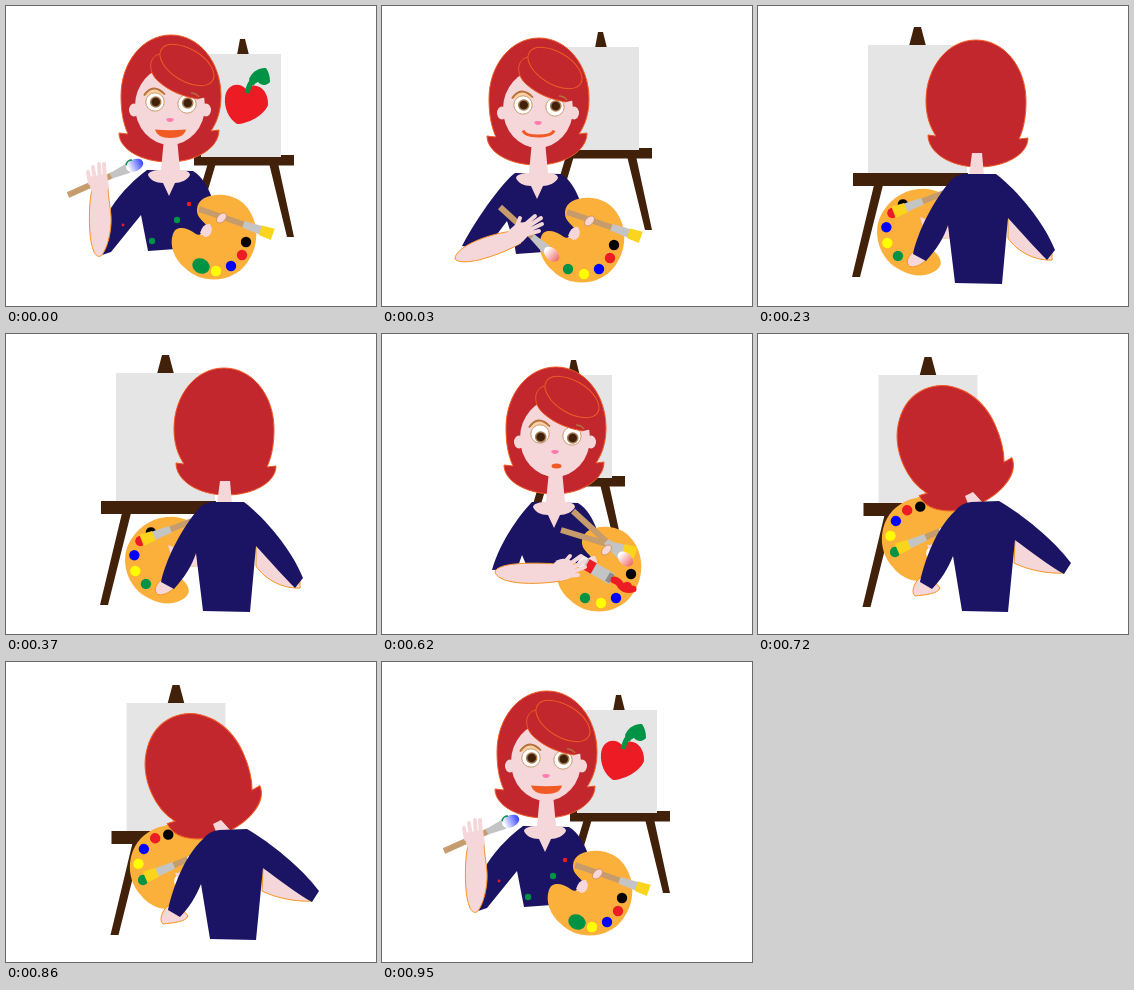
These frames come from a looping animation (370x300 px, 980 ms). An HTML page:

```html
<!DOCTYPE html>
<html lang="en">
<head>
<meta charset="utf-8">
<title>Painter</title>
<style>
  html, body { margin: 0; width: 100%; height: 100%; overflow: hidden; background: #fff; }
  svg { display: block; width: 370px; height: 300px; }
</style>
</head>
<body>
<svg id="stage" viewBox="0 0 370 300"></svg>
<script>
const SKIN = '#f5d7da', NAVY = '#1b1464', WOOD = '#42210b', HAIR = '#c1272d',
  ORANGE = '#f15a24', EDGE = '#f7931e', TAN = '#c69c6d', GREY = '#c4c4c4', BROW = '#b5703c',
  RED = '#ed1c24', GREEN = '#009245', BLUE = '#0000ff', YELLOW = '#ffff00', GOLD = '#fbd51d';

const path = (d, fill, extra = '') => `<path d="${d}" fill="${fill}" ${extra}/>`;
const rim = (color, width = 1) => `stroke="${color}" stroke-width="${width}"`;
const line = (d, color, width, extra = '') => path(d, 'none', `${rim(color, width)} ${extra}`);
const oval = (x, y, rx, ry, fill, turn = 0, extra = '') =>
  `<ellipse cx="${x}" cy="${y}" rx="${rx}" ry="${ry}" fill="${fill}" transform="rotate(${turn} ${x} ${y})" ${extra}/>`;
const dot = (x, y, r, fill, extra = '') => oval(x, y, r, r, fill, 0, extra);
const rect = (x, y, w, h, fill) => `<rect x="${x}" y="${y}" width="${w}" height="${h}" fill="${fill}"/>`;
const group = (transform, ...parts) => `<g transform="${transform}">${parts.join('')}</g>`;
const move = (x, y, ...parts) => group(`translate(${x} ${y})`, ...parts);
const skin = d => path(d, SKIN, rim(EDGE));
const fingers = (d, width = 4) => line(d, SKIN, width, 'stroke-linecap="round"');

// Brushes lie along +x from the handle end.
const brush = (x, y, turn, length) => group(
  `translate(${x} ${y}) rotate(${turn})`,
  path(`M0-3H${length - 28}V3H0Z`, TAN),
  path(`M${length - 31}-3.5L${length - 12}-4.5V4.5L${length - 31} 3.5Z`, GREY),
  path(`M${length - 13}-5L${length}-6V6L${length - 13} 5Z`, GOLD));
const softBrush = (x, y, turn, length, tip) => group(
  `translate(${x} ${y}) rotate(${turn})`,
  path(`M0-3H${length - 32}V3H0Z`, TAN),
  path(`M${length - 34}-3L${length - 15}-5V5L${length - 34} 3Z`, GREY),
  oval(length - 8, 0, 9, 6, tip));

// Front view pieces
const easel = (x, y, art = '') => move(x, y,
  path('M234 33H239L243 49H231Z', WOOD),
  path('M202 157H210L196 204H188Z M263 157H272L288 231H281Z', WOOD),
  rect(188, 149, 100, 10.5, WOOD), rect(195, 48, 80, 103, '#e5e5e5'), art);

const apple = path('M240 83C233 75 220 78 219 92C218 102 223 113 231 118C241 118 258 110 262 99C263 84 250 74 240 83Z', RED)
  + line('M241 87Q243 78 248 72', GREEN, 5)
  + path('M243 73C247 64 254 62 260 62C263 66 264 71 264 76C259 81 255 79 252 76Q249 77 247 80Z', GREEN);

const hair = path('M165 29C193 29 215 56 215 90C215 105 211 116 205 125L213 124C213 142 190 156 163 156C135 156 113 143 113 127L122 128C117 117 115 105 115 90C115 56 137 29 165 29Z', HAIR, rim(ORANGE));

const eye = (x, y, look) => dot(x, y, 9.2, '#fff', rim(TAN))
  + dot(x + .7, y + look, 5.8, '#a67c52') + dot(x + .7, y + look, 4.3, WOOD);

const head = (look, mouth) => hair
  + oval(128, 104, 5, 6.5, SKIN) + oval(200, 104, 5, 6.5, SKIN)
  + oval(164, 100, 35, 39, SKIN)
  + path('M138 90Q147 76 159 89L149 88Z', '#fcd0a2')
  + line('M138 89.5Q147 76 159 88.5', BROW, 1.8)
  + eye(149, 96, look) + eye(181, 98, look - 1)
  + path('M154 48C143 50 141 65 152 75C164 86 179 91 192 93L201 91V80Z', HAIR)
  + line('M154 48C143 50 141 65 152 75C164 86 179 91 192 93', ORANGE, 1)
  + line('M185 87Q190 87 193 91', BROW, 1.5)
  + oval(181, 59, 30, 16, HAIR, 31, rim(ORANGE))
  + path('M160 113Q164 111 168 113Q167 116 164 116Q161 116 160 113Z', '#ff7bac')
  + mouth;

const torso = sleeve =>
  path(`M141 164${sleeve}L142 245L170 243L200 225L206 192C203 183 196 170 187 165Z`, NAVY)
  + path('M158 132H171L174 164C180 164 184 166 184 169C182 174 174 177 169 177L163 190L157 177C150 177 144 174 142 169C142 166 148 164 155 164Z', SKIN);

const board = path('M191 203C192 187 222 184 237 197C253 212 255 238 241 257C227 277 196 279 179 262C168 253 163 239 167 228C170 219 181 222 187 226C193 231 199 229 201 223C203 217 190 214 191 203Z', '#fbb03b');
const paints = [[194, 260, GREEN], [210, 265, YELLOW], [225, 260, BLUE], [236, 249, RED], [240, 236, '#000']]
  .map(([x, y, color]) => dot(x, y, 5.2, color)).join('');
const thumb = path('M194 227Q197 217 204 218L206 223Q205 231 199 231Z', SKIN);
const fingertip = oval(215.5, 212, 6, 3.8, SKIN, -45, rim('#d08a4a', .8));
const palette = board + paints + thumb + brush(193, 203, 19, 78) + fingertip;

// Back view pieces
const backEasel = (x, y) => move(x, y,
  path('M156 21H163L168 40H151Z', WOOD), rect(110, 39, 99, 129, '#e5e5e5'),
  path('M116 179H125L102 271H94Z', WOOD), rect(95, 167, 115, 13, WOOD));
const backHair = (x, y, turn) => group(`translate(${x} ${y}) rotate(${turn}) scale(-1 1) translate(-165 -90)`, hair);
const backPalette = (x, y, turn) => group(`translate(${x} ${y}) rotate(${turn}) scale(-1 1)`, board, paints);

const showOff = easel(0, 0, apple)
  + head(0, path('M149 123.5Q164 125 180 123.5Q178 132 164 132Q151 132 149 123.5Z', ORANGE))
  + torso('C130 172 116 185 105 202L96 249L105 246L135 209')
  + dot(171, 214, 3.2, GREEN) + dot(146, 235, 3.2, GREEN) + dot(183, 198, 2.2, RED) + dot(117, 219, 1.4, RED)
  + palette + oval(195, 260, 9, 7.5, GREEN, 25)
  + softBrush(62, 189, -24, 81, 'url(#blueTip)') + line('M120 159Q121 154 126 154', GREEN, 1.5)
  + skin('M86 184C83 195 83 215 84 228C86 246 90 252 95 250C101 244 106 225 105 210C104 198 102 190 102 180Z')
  + path('M81 171L101 168L103 182Q95 190 86 187Z', SKIN)
  + fingers('M84 177L82 166M89 175L87 161M94 174L93 158M99 175L98 158');

const mixing = easel(-18, -7)
  + move(-8, 3,
    head(0, line('M149 121.5Q151 127 164 127Q178 127 180 121.5', ORANGE, 3)),
    torso('C130 172 105 205 88 237L112 240L133 212L140 233'), palette)
  + softBrush(118, 201, 42.5, 78, 'url(#redTip)')
  + skin('M73 253C73 241 105 228 131 225L139 237C121 248 81 262 73 253Z')
  + path('M125 227Q133 216 143 216L148 226Q143 236 133 240Z', SKIN)
  + fingers('M139 222L153 210M142 223L159 212M143 226L160 218M142 229L157 225M134 222L138 212');

const squeezing = easel(-45, -7)
  + move(9, 4,
    head(3, oval(165.5, 128, 5, 2.5, ORANGE)),
    torso('C133 172 110 200 101 232L126 231L131 217L137 231'),
    board, paints, thumb)
  + brush(179, 196, 17, 78) + softBrush(191, 177, 42.5, 79, 'url(#redTip)')
  + move(9, 4, fingertip)
  + group('translate(197 226) rotate(30)',
    rect(0, -6, 38, 12, GREY), rect(9, -6, 8, 12, RED), rect(0, -6, 7, 12, '#eee'), rect(33, -5, 5, 10, '#8c8c8c'))
  + line('M232 246Q237 247 239 252Q244 257 251 255', RED, 7, 'stroke-linecap="round"')
  + skin('M113 238C115 229 145 228 176 230L184 246C160 251 117 252 113 238Z')
  + path('M171 231Q176 222 188 226L194 237Q190 246 178 247Z', SKIN)
  + fingers('M180 231L188 222M185 232L199 222M188 235L203 227M188 239L203 233M184 242L196 241');

const paintingUpright = backEasel(0, 0) + backHair(218, 95, 0)
  + path('M214 147H224L226 170H211Z', SKIN)
  + backPalette(453.7, 332.5, 68) + brush(186, 187, 159, 54)
  + path('M162 211L191 222V233L168 230Z', SKIN)
  + skin('M250 211L250 232C260 247 279 255 294 254L294 246Z')
  + skin('M156 245C148 251 147 260 154 261C162 260 167 256 170 251Z')
  + path('M208 168H238C260 185 286 216 297 244L289 254C276 241 262 225 250 212L244 278L197 277L190 219C186 232 178 244 168 255L155 248C160 225 175 195 194 173Q200 168 208 168Z', NAVY);

const paintingTilted = backEasel(10.5, 2) + backPalette(391.9, 418.7, 91.5)
  + backHair(191.3, 111, -24)
  + path('M207 162L215 158L225 169L211 172Z', SKIN)
  + brush(187, 195, 157, 52) + dot(183, 196, 2, '#fff')
  + path('M169 211L190 209L190 221L174 222Z', SKIN)
  + skin('M257 206L256 229C270 236 290 240 306 239L304 230Z')
  + skin('M163 243C155 249 153 259 157 262C166 261 180 260 182 254L176 247Z')
  + path('M213 168L241 167C265 181 296 206 313 229L306 240C290 231 272 217 257 206L250 278L204 277L195 222C190 235 182 247 174 255L162 248C167 225 178 195 197 177Q203 169 213 168Z', NAVY);

const tip = (id, color) => `<linearGradient id="${id}"><stop offset=".1" stop-color="#fff"/><stop offset="1" stop-color="${color}"/></linearGradient>`;
const poses = [showOff, mixing, paintingUpright, squeezing, paintingTilted, showOff];
const ends = [30, 230, 460, 720, 950, 980];

const stage = document.getElementById('stage');
stage.innerHTML = `<defs>${tip('blueTip', '#3040ff')}${tip('redTip', '#ee6a68')}</defs>`
  + poses.map(pose => `<g class="pose">${pose}</g>`).join('');
const layers = [...stage.querySelectorAll('.pose')];
const start = performance.now();

function draw(now) {
  const time = Math.max(0, now - start) % 980;
  const current = ends.findIndex(end => time < end);
  layers.forEach((layer, i) => layer.style.display = i === current ? '' : 'none');
  requestAnimationFrame(draw);
}
draw(start);
</script>
</body>
</html>
```
